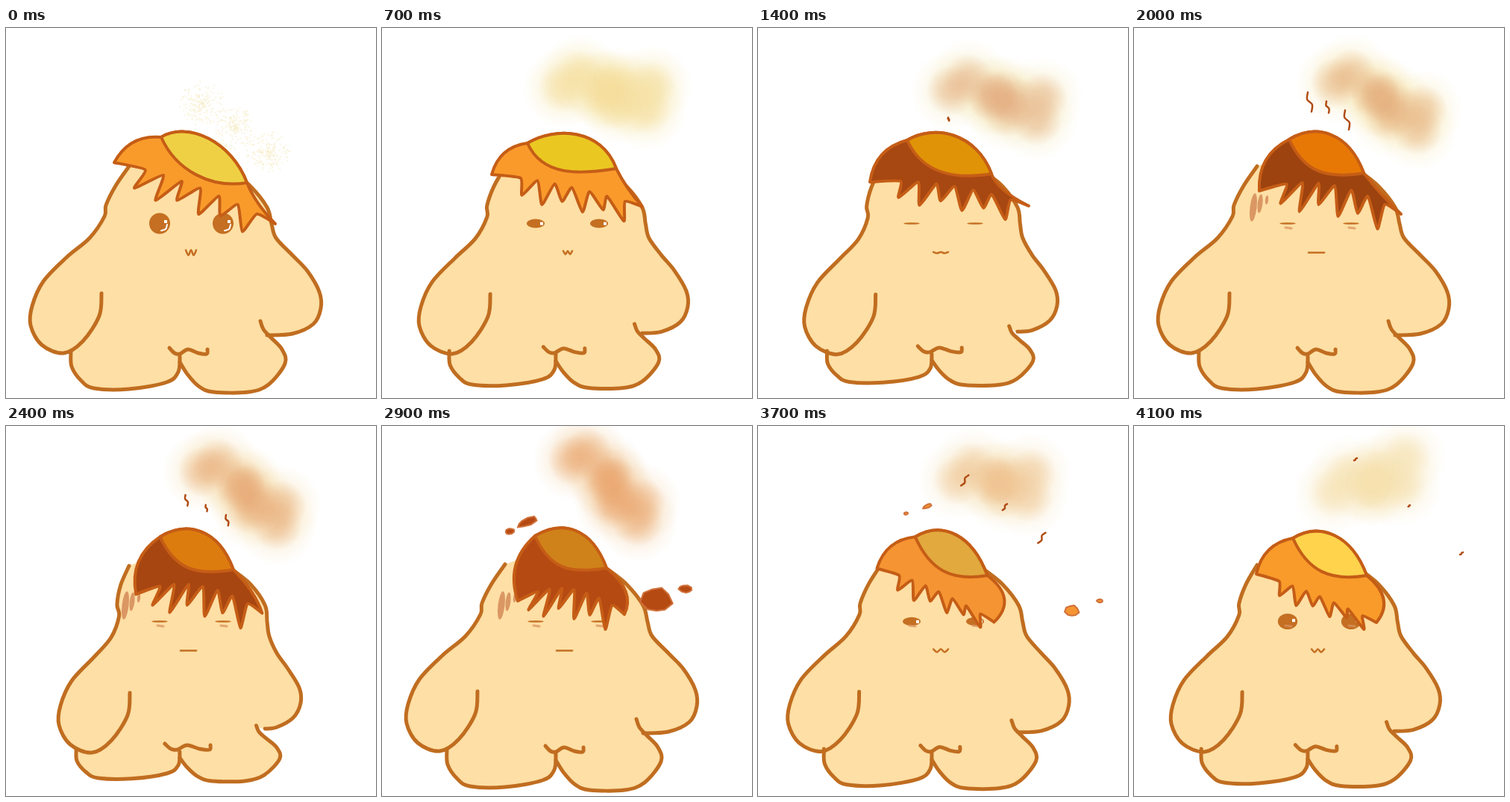
Animation of 496 by 495 pixels, one loop 4200 ms. Source, as an HTML page with a canvas:

```html
<!DOCTYPE html>
<html>
<head>
<meta charset="utf-8">
<style>
html, body { margin: 0; width: 100%; height: 100%; overflow: hidden; background: #fff; }
canvas { display: block; }
</style>
</head>
<body>
<canvas id="stage" width="496" height="495"></canvas>
<script>
const ctx = document.getElementById('stage').getContext('2d');
const LOOP = 4200, STEP = 100, SWAY = 9.7, TEETH = 6;

const points = s => s.split(' ').map(p => p.split(',').map(Number));
const rgb = hex => [1, 3, 5].map(i => parseInt(hex.slice(i, i + 2), 16));
const css = (c, a = 1) => `rgba(${c.map(Math.round)},${a})`;
const clamp = v => Math.max(0, Math.min(1, v));
const quad = (a, b, c, t) => mix(mix(a, b, t), mix(b, c, t), t);

function mix(a, b, t) {
  if (typeof a === 'number') return a + (b - a) * t;
  if (Array.isArray(a)) return a.map((v, i) => mix(v, b[i], t));
  return Object.fromEntries(Object.keys(a).map(k => [k, mix(a[k], b[k], t)]));
}

function seeded(seed) {
  return () => (seed = seed * 16807 % 2147483647) / 2147483647;
}

// The widest pose; squeeze() narrows it by k = 0..1
const body = {
  armL: points('165,185 147,211 134,237 132,252 112,281 81,307 50,339 35,372 33,398 48,424 77,435 103,419 125,385 128,355'),
  legL: points('87,432 88,453 101,472 118,482 165,483 215,474 231,460 233,437'),
  legR: points('233,447 243,463 258,479 278,487 325,487 352,477 374,449 370,430 355,414 345,403 341,392'),
  armR: points('350,411 384,409 412,396 422,375 420,353 404,325 384,304 362,281 356,262 350,240 328,212 303,192'),
  belly: points('219,428 226,435 233,436 244,430 258,435 269,436 270,430')
};

function squeeze(k) {
  const leg = ([x, y]) => [x + (231 - x) * .05 * k, y + (432 - y) * .22 * k];
  return {
    armL: body.armL.map(([x, y]) => [x + 38 * k * clamp((y - 190) / 120), y + 2 * k]),
    legL: body.legL.map(leg),
    legR: body.legR.map(leg),
    armR: body.armR.map(([x, y]) => [x - 27 * k * clamp((x - 345) / 50), y - 6 * k * clamp((y - 300) / 100)]),
    belly: body.belly.map(([x, y]) => [x + (x - 250) * .2 * k, y - 3 * k])
  };
}

// [distance from the widest beat, squeeze]
const sway = [[1.1, 0], [1.9, .2], [3.2, .45], [4.6, .78], [9, 1]];

// hair: left tip, right tip, cap right, cap left; shape: hem lift, right bulge, tooth depth, lean
// colors: hair, cap, cloud core, cloud halo; face: eye height, mouth half width, mouth wave
// lobes: two ends of the cloud; marks: first place, spacing, stroke vector
const key = (at, hair, shape, colors, face, lobes, marks) => ({
  at, hair: points(hair), shape, colors: colors.split(' ').map(rgb), face, lobes: points(lobes), marks: points(marks)
});
const keys = [
  key(0, '145,180 361,262 323,207 208,146', [21, -8, 25, -26], '#f99b2b #efd044 #f7e8b8 #faf3d8', [14, 7, 3.5], '262,100 350,165', '250,120 20,5 0,0'),
  key(7, '147,196 349,239 314,188 195,154', [12, -5, 25, -9], '#fa9a2b #ebc722 #f5dc9a #f7e9b6', [6, 6, 2.2], '258,82 365,96', '255,122 0,0 0,0'),
  key(14, '150,206 363,238 313,195 200,150', [23, -18, 25, -14], '#a74712 #e09306 #e3aa7e #f6ebc4', [1.3, 10, .8], '274,86 385,112', '255,120 0,0 1,4'),
  key(20, '168,218 358,249 308,194 208,149', [48, -4, 32, -18], '#9d430f #e87805 #e3aa78 #f8ebc0', [1.3, 10.5, 0], '285,76 390,128', '233,86 25,12 5,26'),
  key(29, '182,234 325,252 301,190 205,147', [50, 27, 31, -20], '#b64a13 #cf8219 #e9a26a #f5d9b5', [1.3, 10.5, 0], '271,48 350,122', '250,100 30,15 0,0'),
  key(34, '156,185 310,262 304,200 209,147', [20, 40, 20, -12], '#f38f38 #cb8933 #e9ab78 #f8e8cc', [2, 11, 1.8], '283,62 372,98', '270,83 37,20 -15,22'),
  key(41, '164,198 325,263 312,200 213,150', [10, 32, 19, -8], '#f89b2a #ffd34c #f5dfab #f9eccb', [10.5, 8.5, 2], '282,92 368,60', '299,43 71,63 -4,3')
];

function curve(pts, k = 1) {
  ctx.moveTo(...pts[0]);
  for (let i = 1; i < pts.length; i++) {
    const p0 = pts[i - 2] || pts[0], p1 = pts[i - 1], p2 = pts[i], p3 = pts[i + 1] || p2;
    const s = k / 6;
    ctx.bezierCurveTo(
      p1[0] + (p2[0] - p0[0]) * s, p1[1] + (p2[1] - p0[1]) * s,
      p2[0] - (p3[0] - p1[0]) * s, p2[1] - (p3[1] - p1[1]) * s, ...p2);
  }
}

function stroke(pts, width, color) {
  ctx.beginPath();
  curve(pts);
  ctx.lineWidth = width;
  ctx.strokeStyle = color;
  ctx.stroke();
}

function paint(fill, line, width) {
  ctx.fillStyle = fill;
  ctx.strokeStyle = line;
  ctx.lineWidth = width;
  ctx.fill();
  ctx.stroke();
}

function ellipse(x, y, rx, ry, color, turn = 0) {
  ctx.beginPath();
  ctx.ellipse(x, y, rx, ry, turn, 0, 7);
  ctx.fillStyle = color;
  ctx.fill();
}

function puff(x, y, r, color, alpha) {
  const g = ctx.createRadialGradient(x, y, 0, x, y, r);
  [1, .85, .4, 0].forEach((a, i) => g.addColorStop(i / 3, css(color, a * alpha)));
  ellipse(x, y, r, r, g);
}

function drawCloud({ lobes: [a, b], colors }, beat) {
  const rand = seeded(11), solid = clamp(beat / 5);
  const spots = [...Array(9).keys()].map(i => {
    const [x, y] = mix(a, b, i / 8);
    return [x + (rand() - .5) * 30, y + (rand() - .5) * 46];
  });
  spots.forEach(([x, y]) => puff(x, y, 54, colors[3], .6 * solid));
  spots.forEach(([x, y]) => puff(x, y, 34, colors[2], .5 * solid));
  ctx.fillStyle = `rgba(247,238,205,${clamp(1 - beat / 4) * .6})`;
  for (let i = 0; i < 600; i++) {
    const [x, y] = mix(a, b, i % 3 / 2), turn = rand() * 6.28, d = 30 * rand();
    ctx.fillRect(x + d * Math.cos(turn), y + d * Math.sin(turn), 2, 2);
  }
}

function drawBody(parts) {
  const { belly, ...limbs } = parts, skin = '#fedfa5';
  ctx.beginPath();
  Object.values(limbs).forEach(p => [p[0], p[p.length - 1]].forEach(q => ctx.lineTo(...q)));
  ctx.lineTo(250, 155);
  paint(skin, skin, 2);
  Object.values(limbs).forEach(p => {
    ctx.beginPath();
    curve(p);
    ctx.closePath();
    paint(skin, skin, 2);
  });
  Object.values(parts).forEach(p => stroke(p, 5, '#c06d20'));
}

function drawFace([ry, w, wave], beat) {
  const brown = '#c46f22';
  const blush = `rgba(217,145,95,${clamp((beat - 15) / 4) * .75})`;
  for (const x of [206, 291]) {
    ellipse(x, 261.5, 10.5 + ry / 4, ry, brown);
    ctx.fillStyle = '#fff';
    if (ry > 4) ctx.fillRect(x + 6, 257 + (14 - ry) / 3, 4, 4);
    if (ry > 12) stroke([[x + 2, 271], [x + 8, 269], [x + 10, 263]], 2, '#fff');
    stroke([[x - 3, 267], [x + 5, 268]], 3, blush);
  }
  const mouth = [-1, -.5, 0, .5, 1].map((u, i) => [255 - w + u * w, 300.5 + wave * (i % 2 ? 1 : -1)]);
  stroke(mouth, 2.5, brown);
  const shade = clamp((beat - 15) / 4) * clamp((33 - beat) / 3);
  for (let i = 0; i < 3; i++) {
    ellipse(160 + 9 * i, 240 - 5 * i, 4.5 - 1.2 * i, 19 - 6.5 * i, `rgba(212,139,88,${shade * .85})`, .12);
  }
}

function fringe(left, right, lift, depth, lean) {
  const hem = [(left[0] + right[0]) / 2 - 5, (left[1] + right[1]) / 2 - lift];
  const at = t => quad(left, hem, right, t);
  const pts = [left];
  for (let i = 0; i < TEETH; i++) {
    const t = .2 + .115 * i, [x, y] = at(t + .055);
    pts.push(at(t), [x + lean + 4 * i, y + depth * (i % 2 ? 1.2 : .85)]);
  }
  return [...pts, at(.89), right];
}

function drawHair({ hair: [left, right, [rx, ry], [lx, ly]], shape: [lift, bulge, depth, lean], colors }) {
  const line = '#c55d16', top = [lx + 37, ly - 22, rx - 20, ry - 54];
  const [x, y] = left;
  ctx.beginPath();
  curve(fringe(left, right, lift, depth, lean), .55);
  ctx.quadraticCurveTo((rx + right[0]) / 2 + bulge, (ry + right[1]) / 2, rx, ry);
  ctx.bezierCurveTo(top[2], top[3], top[0], top[1], lx, ly);
  ctx.quadraticCurveTo((lx + x) / 2 - (y - ly) * .33, (ly + y) / 2 - (lx - x) * .33, x, y);
  paint(css(colors[0]), line, 4);
  ctx.beginPath();
  ctx.moveTo(lx, ly);
  ctx.bezierCurveTo(...top, rx, ry);
  ctx.bezierCurveTo(rx - 48, ry + 8, lx + 20, ly + 45, lx, ly);
  paint(css(colors[1]), line, 4);
}

function drawMarks([[x, y], [sx, sy], [dx, dy]]) {
  if (Math.hypot(dx, dy) < 3) return;
  for (let i = 0; i < 3; i++) {
    const size = i % 2 ? .6 : 1;
    const at = (t, w) => [x + sx * i + (dx * t - dy * w) * size, y + sy * i + (dy * t + dx * w) * size];
    stroke([at(0, 0), at(.35, .1), at(.65, -.1), at(1, 0)], 2.5, '#b04c14');
  }
}

// Flying bits: place at beat 29, speed per beat, radii
const bits = [[195, 128, 4, -2.6, 15, 5], [171, 141, 3.4, -3, 6, 4], [368, 233, 6.6, 1.8, 19, 17], [407, 218, 6.4, 2, 9, 5]];

function drawBits(color, beat) {
  const rand = seeded(5), size = Math.min(clamp((beat - 24) / 4), clamp((41 - beat) / 9));
  if (!size) return;
  for (const [x, y, vx, vy, rx, ry] of bits) {
    const turn = Math.sign(x - 250) * .3 - .1, age = beat - 29;
    ctx.save();
    ctx.translate(x + vx * age, y + vy * age);
    ctx.rotate(turn);
    ctx.beginPath();
    for (let i = 0; i < 9; i++) {
      const a = i * Math.PI / 4.5, k = size * (.8 + .4 * rand());
      ctx.lineTo(rx * k * Math.cos(a), ry * k * Math.sin(a));
    }
    ctx.closePath();
    ctx.restore();
    paint(css(color), '#d0713a', 2);
  }
}

function draw(now) {
  const beat = Math.floor(now % LOOP / STEP);
  const i = Math.max(0, keys.findIndex(k => k.at >= beat) - 1), a = keys[i], b = keys[i + 1];
  const state = mix(a, b, (beat - a.at) / (b.at - a.at));
  const phase = beat % SWAY, away = Math.min(phase, SWAY - phase);
  ctx.clearRect(0, 0, 496, 495);
  ctx.lineCap = ctx.lineJoin = 'round';
  drawCloud(state, beat);
  drawBody(squeeze(sway.find(([limit]) => away < limit)[1]));
  drawFace(state.face, beat);
  drawHair(state);
  drawMarks(state.marks);
  drawBits(state.colors[0], beat);
}

const begin = performance.now();
(function tick() {
  draw(performance.now() - begin);
  requestAnimationFrame(tick);
})();
</script>
</body>
</html>
```
